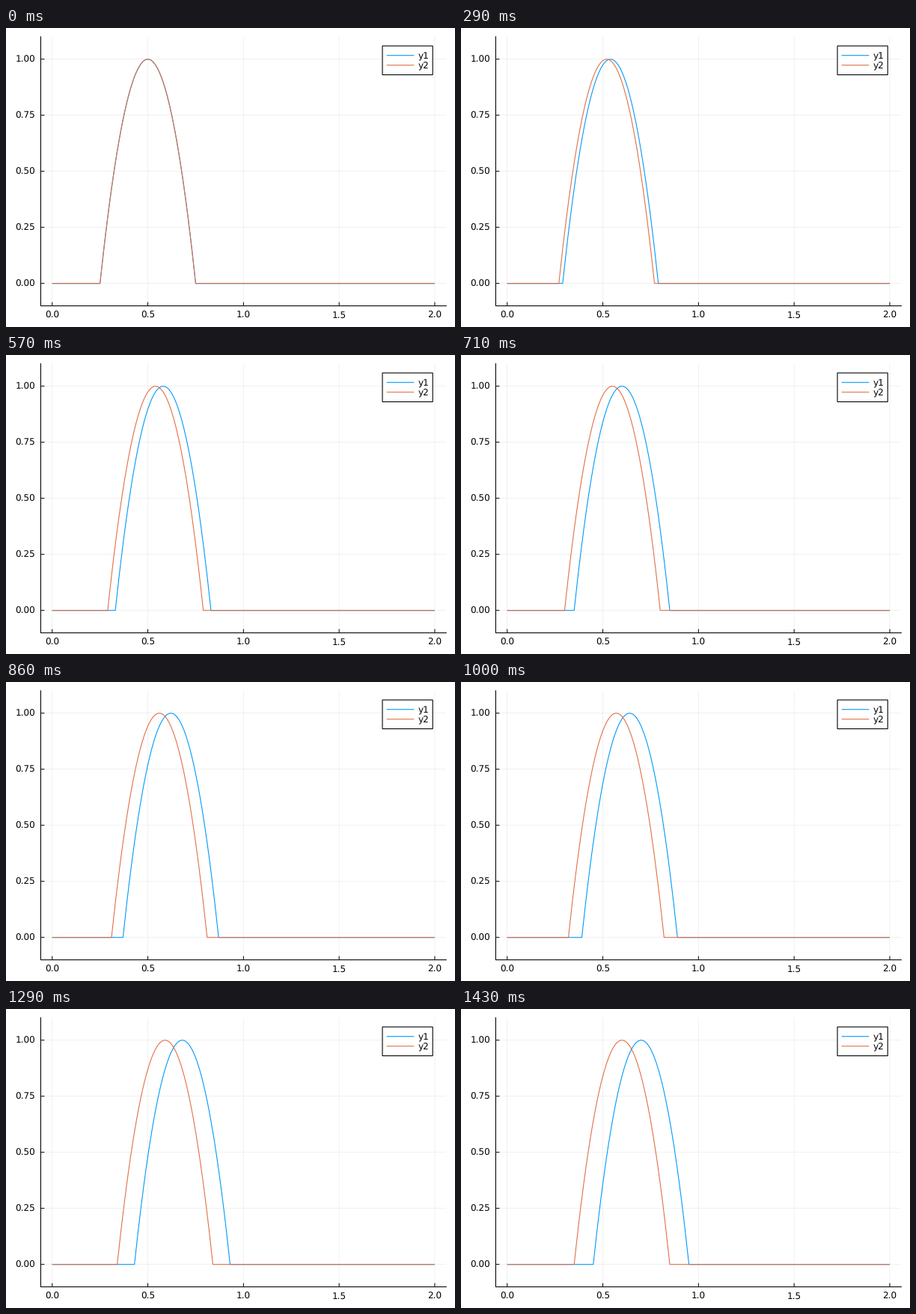
Animation of 600x400 px, one loop 1570 ms. Source, as a matplotlib script:

```python
import matplotlib.pyplot as plt
import numpy as np
from matplotlib.animation import FuncAnimation

WIDTH, HEIGHT, DPI = 600, 400, 100
PX = 72 / DPI  # points per pixel
BLUE, ORANGE = "#009AFA", "#E26F46"
LEFT, RIGHT, TOP, BOTTOM = 46.4, 588.3, 11.7, 371.7
TICK = 5
STEP_MS, LOOP_MS, FPS, POSES = 10, 1570, 7, 11

plt.rcParams.update({
    "font.family": "DejaVu Sans",
    "font.size": 12 * PX,
    "text.hinting": "none",
    "path.snap": False,
})

fig = plt.figure(figsize=(WIDTH / DPI, HEIGHT / DPI), dpi=DPI, facecolor="white")
ax = fig.add_axes([0, 0, 1, 1])
ax.set_xlim(0, WIDTH)
ax.set_ylim(HEIGHT, 0)
ax.axis("off")


def to_x(value):
    return LEFT + (np.asarray(value) + 0.06) / 2.12 * (RIGHT - LEFT)


def to_y(value):
    return BOTTOM - (np.asarray(value) + 0.1) / 1.2 * (BOTTOM - TOP)


def stroke(xs, ys, color="black", width=1.0, **style):
    style = {"solid_capstyle": "butt", "solid_joinstyle": "round", **style}
    return ax.plot(xs, ys, color=color, lw=width * PX, **style)[0]


def bump(x, center):
    return np.maximum(0, 1 - 16 * (x - center) ** 2)


# Grid, ticks and tick labels
for value in np.linspace(0, 2, 5):
    x = to_x(value)
    stroke([x, x], [TOP, BOTTOM], width=0.55, alpha=0.1, zorder=1)
    stroke([x, x], [BOTTOM, BOTTOM - TICK], zorder=2)
    ax.text(x, 387.5, f"{value:.1f}", ha="center", va="baseline")
for value in np.linspace(0, 1, 5):
    y = to_y(value)
    stroke([LEFT, RIGHT], [y, y], width=0.55, alpha=0.1, zorder=1)
    stroke([LEFT, LEFT + TICK], [y, y], zorder=2)
    ax.text(39, y + 4.4, f"{value:.2f}", ha="right", va="baseline")
stroke([LEFT, LEFT, RIGHT], [TOP, BOTTOM, BOTTOM], width=1.1,
       solid_capstyle="projecting", solid_joinstyle="miter", zorder=2)

# Curves
xs = np.linspace(0, 2, 201)
speeds = (0.02, 0.01)
curves = [stroke(to_x(xs), to_y(bump(xs, 0.5)), color, 1.1, zorder=3)
          for color in (BLUE, ORANGE)]

# Legend
ax.add_patch(plt.Rectangle((503, 24), 67.2, 38.6, fc="white", ec="black",
                           lw=1.1 * PX, zorder=4))
for name, color, y in (("y1", BLUE, 36.7), ("y2", ORANGE, 49.7)):
    stroke([508.6, 545.3], [y, y], color, 1.1, zorder=5)
    ax.text(551, y + 4.4, name, va="baseline", zorder=5)

starts = [round(k * 1000 / FPS / STEP_MS) for k in range(POSES)]


def update(frame):
    pose = sum(start <= frame for start in starts) - 1
    for curve, speed in zip(curves, speeds):
        curve.set_ydata(to_y(bump(xs, 0.5 + speed * pose)))
    return curves


anim = FuncAnimation(fig, update, frames=LOOP_MS // STEP_MS, interval=STEP_MS,
                     repeat=True, repeat_delay=0)
plt.show()
```
